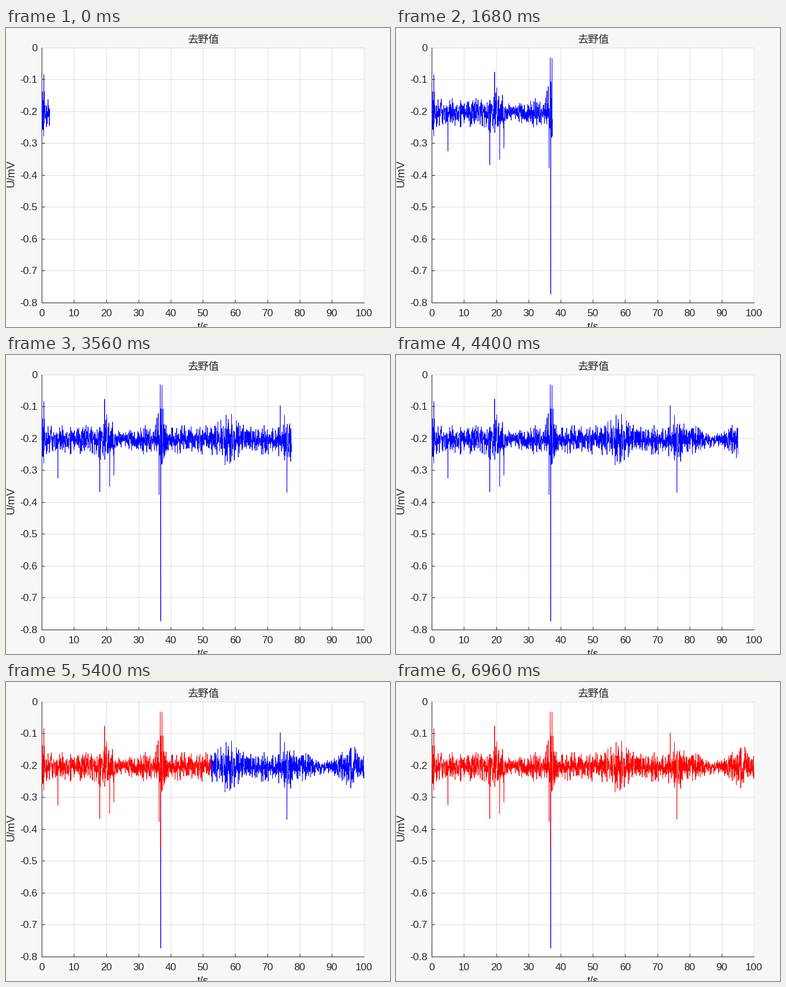
Write a matplotlib script that moves like this. It is 646x502 px and loops after 7.16 s.

```python
import numpy as np
import matplotlib.pyplot as plt
from matplotlib.animation import FuncAnimation

W, H, DPI = 646, 502, 64
TICK_MS, TICKS = 40, 179
LEFT, RIGHT, TOP, BOTTOM = 60.2, 602.2, 32.7, 460.7
INK, GRID, PAPER = "#262626", "#dfdfdf", "#f7f7f7"
RATE, CHUNK, CHUNKS = 20, 50, 40      # samples per second, per chunk; chunks
BASE, FLOOR = -0.205, -0.46           # resting level, limit of the clean trace
RED_START, RED_END = 120, 152         # ticks of the second sweep

# Bursts and lulls of the noise band: centre (s), width (s), height (mV)
SWELLS = [(0, 1.5, .045), (20, 2, .03), (26, 2.5, -.017), (37, 1.2, .06),
          (58, 3, .032), (76, 1.8, .03), (88, 4, -.02), (96, 2.5, .018)]

# Strongest single peaks: (s, mV)
PEAKS = [(.65, -.085), (5, -.325), (18, -.368), (19.5, -.077), (21.1, -.351),
         (22.4, -.316), (36.4, -.377), (36.75, -.032), (36.9, -.774),
         (37.3, -.034), (74, -.098), (76.1, -.37)]

plt.rcParams["path.simplify"] = False


def pt(px):
    return px * 72 / DPI


def make_signal():
    rng = np.random.default_rng(12)
    t = np.arange(CHUNKS * CHUNK + 1) / RATE
    band = .038 + sum(h * np.exp(-((t - c) / w) ** 2) for c, w, h in SWELLS)
    u = BASE + band * np.clip(rng.normal(0, .5, t.size), -1.2, 1.2)
    for when, level in PEAKS:
        u[round(when * RATE)] = level
    return t, u


t, raw = make_signal()
clean = np.maximum(raw, FLOOR)
outlier = np.convolve(raw < FLOOR, np.ones(3), "same") > 0

fig = plt.figure(figsize=(W / DPI, H / DPI), dpi=DPI, facecolor=PAPER)
ax = fig.add_axes([LEFT / W, 1 - BOTTOM / H,
                   (RIGHT - LEFT) / W, (BOTTOM - TOP) / H])
ax.set(xlim=(0, 100), ylim=(-.8, 0), axisbelow=True)
ax.set_xticks(range(0, 101, 10), [str(x) for x in range(0, 101, 10)])
ax.set_yticks([k / 10 for k in range(-8, 1)],
              [f"{k / 10:g}" for k in range(-8, 1)])
ax.grid(color=GRID, lw=pt(1))
ax.tick_params(direction="in", length=pt(5), width=pt(1), color=INK,
               labelcolor=INK, labelsize=pt(17.2),
               labelfontfamily="Liberation Sans")
ax.tick_params(axis="x", pad=pt(11.5))
ax.tick_params(axis="y", pad=pt(7.5))
for side, spine in ax.spines.items():
    far = side in ("top", "right")
    spine.set(color=GRID if far else INK, linewidth=pt(1),
              zorder=1 if far else 2.5)


def label(x, y, text, size, font="Liberation Sans", **kw):
    fig.text(x / W, 1 - y / H, text, fontsize=pt(size), family=font,
             color=INK, ha="center", va="baseline",
             rotation_mode="anchor", **kw)


label(332, 24.3, "去野值", 17.7, "Noto Sans CJK JP", weight="light")
label(331, 507, "t/s", 18.3)
label(14, 244, "U/mV", 18.3, rotation=90)

blue, = ax.plot([], [], color="#0000ff", lw=pt(.8), zorder=3, clip_on=False)
red, = ax.plot([], [], color="#ff0000", lw=pt(.8), zorder=4, clip_on=False)


def draw(tick):
    head = min(CHUNKS, 1 + (tick + 1) // 3) * CHUNK
    sweep = np.interp(tick, [RED_START, RED_END], [4, CHUNKS])
    done = round(sweep) * CHUNK if tick >= RED_START else 0
    # Blue stays only ahead of the red trace and at the removed outlier
    keep = (np.arange(t.size) >= done) | outlier
    blue.set_data(t[:head + 1], np.where(keep, raw, np.nan)[:head + 1])
    end = done + 1 if done else 0
    red.set_data(t[:end], clean[:end])
    return blue, red


anim = FuncAnimation(fig, draw, frames=TICKS, interval=TICK_MS,
                     repeat=True, repeat_delay=0)
plt.show()
```
